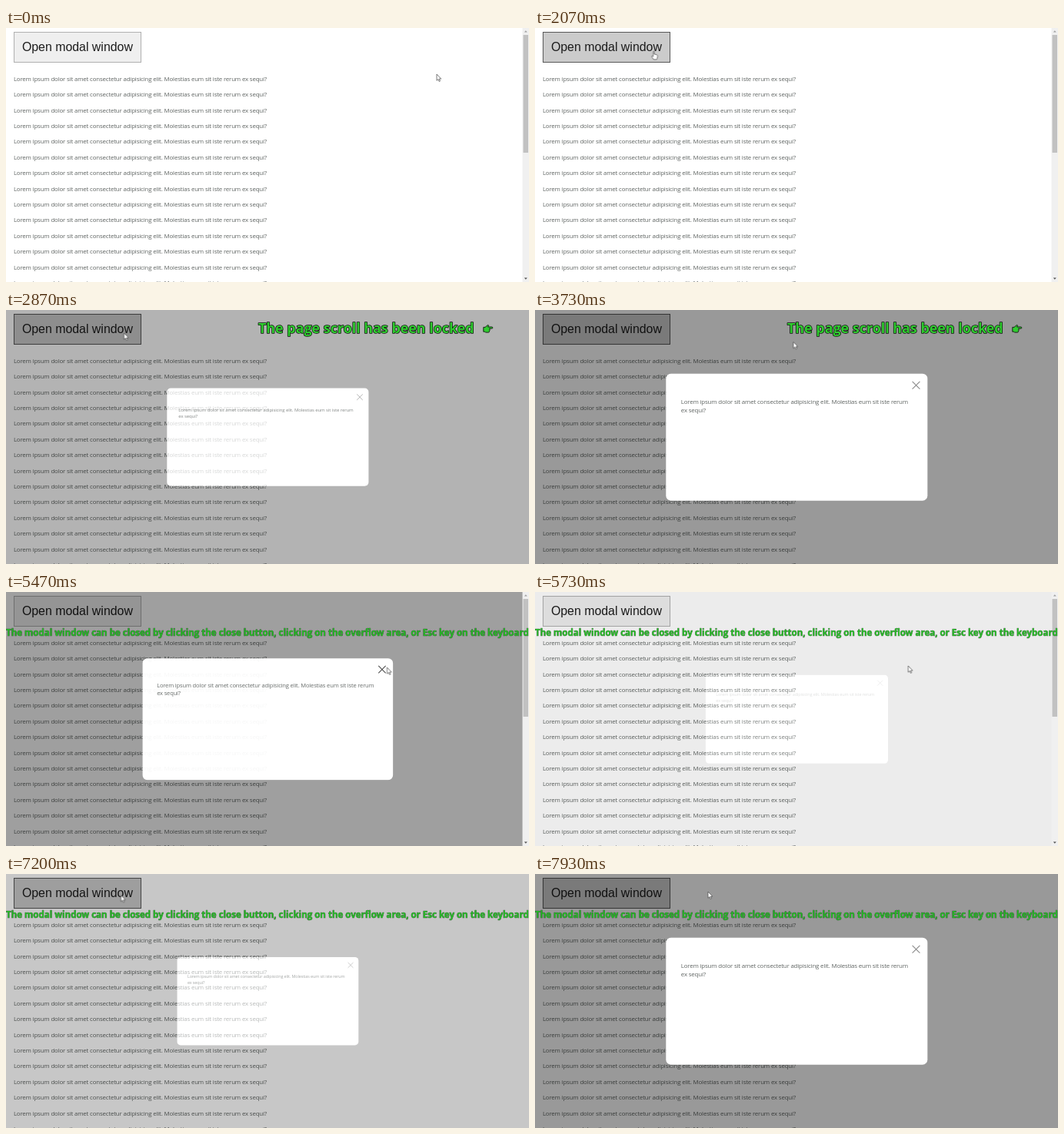
Animation, 680 px wide and 330 px high, one loop 8 s. Source, as an HTML page:

```html
<!DOCTYPE html>
<html lang="en">
<head>
<meta charset="utf-8">
<title>Modal window demo</title>
<style>
html, body { margin: 0; width: 100%; height: 100%; overflow: hidden; background: #fff; }
svg { display: block; width: 680px; height: 330px; }
svg * { animation-duration: 8s; animation-iteration-count: infinite; animation-timing-function: linear; }
text { white-space: pre; }

.copy { font: 7.9px "Open Sans", sans-serif; letter-spacing: -.17px; fill: #606563; }
.label { font: 15.9px "Liberation Sans", Arial, sans-serif; fill: #1c1c1c; }
.caption { font: bold 17.9px "Open Sans", sans-serif; fill: #2fcb2f; stroke: #111; stroke-width: 1.5; stroke-linejoin: round; paint-order: stroke; }
.caption.long { font-size: 11.52px; fill: #22b922; stroke: #000; stroke-opacity: .6; stroke-width: .7; }

.button { fill: #efefef; stroke: #b0b0b0; animation-name: press; }
.overlay { opacity: 0; animation-name: fade; }
.modal { transform-origin: 340.5px 165.2px; animation-name: grow; }
.cross { stroke: #8a8a8a; stroke-width: 1.1; animation-name: cross; }
.pointer { animation-name: travel; }
.button, .cross, .bar, .first, .second, .arrow, .hand { animation-timing-function: step-end; }
.bar { animation-name: bar; }
.first { animation-name: first; }
.second { animation-name: second; }
.arrow { animation-name: arrow; }
.hand { animation-name: hand; }

@keyframes press {
  0%, 67%, 100% { fill: #efefef; stroke: #b0b0b0; }
  19.2%, 81.4%, 99.99% { fill: #cbcbcb; stroke: #585858; }
}
@keyframes fade {
  0% { opacity: 0; }
  32.5% { opacity: 0; animation-timing-function: ease; }
  40% { opacity: 1; }
  67.86% { opacity: 1; animation-timing-function: ease; }
  75.36% { opacity: 0; }
  87.59% { opacity: 0; animation-timing-function: ease; }
  95.09%, 100% { opacity: 1; }
}
@keyframes grow {
  0%, 32.5% { transform: scale(.5); }
  38.75%, 67.86% { transform: scale(1); }
  74.11%, 87.59% { transform: scale(.5); }
  93.84%, 100% { transform: scale(1); }
}
@keyframes cross {
  0%, 71.5%, 100% { stroke: #8a8a8a; }
  57.5% { stroke: #444; }
}
@keyframes travel {
  0% { transform: translate(560px, 60px); }
  10% { transform: translate(560px, 60px); animation-timing-function: ease-in-out; }
  20.9%, 42.8% { transform: translate(153.5px, 30px); }
  46.6% { transform: translate(334.5px, 41px); animation-timing-function: ease-out; }
  53.4%, 55.6% { transform: translate(482px, 90px); }
  60.9% { transform: translate(495.5px, 98px); }
  70% { transform: translate(495.5px, 98px); animation-timing-function: ease-in-out; }
  83.4% { transform: translate(149.5px, 27.5px); }
  95.9% { transform: translate(149.5px, 27.5px); animation-timing-function: ease-out; }
  99.1%, 100% { transform: translate(225px, 23px); }
}
@keyframes bar {
  0%, 67.86% { visibility: visible; }
  32.5%, 87.59%, 100% { visibility: hidden; }
}
@keyframes first {
  0%, 50%, 100% { visibility: hidden; }
  32.5% { visibility: visible; }
}
@keyframes second {
  0% { visibility: hidden; }
  50%, 100% { visibility: visible; }
}
@keyframes arrow {
  0%, 32.5%, 87.59%, 100% { visibility: visible; }
  19.2%, 81.4% { visibility: hidden; }
}
@keyframes hand {
  0%, 32.5%, 87.59%, 100% { visibility: hidden; }
  19.2%, 81.4% { visibility: visible; }
}
</style>
</head>
<body>
<svg viewBox="0 0 680 330">
  <rect class="button" x="10.5" y="5.5" width="165" height="39"/>
  <text class="label" x="20.9" y="30.4">Open modal window</text>
  <g id="lines" class="copy"></g>

  <g class="overlay">
    <rect width="680" height="330" fill="#000" fill-opacity=".4"/>
    <g class="modal">
      <rect x="170.3" y="82.7" width="340" height="165" rx="6.5" fill="#fff"/>
      <text class="copy" x="189.8" y="122.3">Lorem ipsum dolor sit amet consectetur adipisicing elit. Molestias eum sit iste rerum</text>
      <text class="copy" x="189.8" y="132.8">ex sequi?</text>
      <path class="cross" d="M490.6 92.9l9.8 9.8m0-9.8l-9.8 9.8"/>
    </g>
  </g>

  <g class="bar">
    <rect x="671.5" width="8.5" height="330" fill="#f0f0f0"/>
    <rect x="672.5" y="9" width="6.5" height="153" fill="#c1c1c1"/>
    <path d="M673.8 5.6l2-2.4 2 2.4z" fill="#a0a0a0"/>
    <path d="M673.8 324.4l2 2.4 2-2.4z" fill="#505050"/>
  </g>

  <g class="first">
    <text class="caption" x="328" y="30">The page scroll has been locked</text>
    <path d="M620.8 22.4h2.2l3.2-2.7c1-.5 1.8.5 1.1 1.3l-.9 1h5.4c1.4 0 1.4 2.1 0 2.1h-3.3c1.2.3 1 1.7 0 1.8.8.4.6 1.6-.3 1.7.5.6.1 1.5-.8 1.5h-3.6l-1.4-.9h-1.6z" fill="#2fcb2f" stroke="#111" stroke-width=".9"/>
  </g>
  <text class="caption long second" x="0" y="56.6">The modal window can be closed by clicking the close button, clicking on the overflow area, or Esc key on the keyboard</text>

  <g class="pointer" stroke-linejoin="round">
    <path class="arrow" d="M0 0v8.3l1.9-1.7 1.3 2.9 1.3-.6-1.3-2.8h2.6z" fill="#fff" stroke="#444" stroke-width=".7"/>
    <path class="hand" d="M.2 1c0-1.2 1.4-1.2 1.4 0v3l1.3.3 1.3.3 1.2.6c.5.3.6.8.5 1.5l-.5 2.6-.6 1.6H.7l-2.2-3.3c-.8-1.1.3-1.7 1.1-1l.6.6z" fill="#fff" stroke="#444" stroke-width=".7"/>
  </g>
</svg>
<script>
const lines = document.getElementById("lines");
for (let i = 0; i < 14; i++) {
  const line = document.createElementNS(lines.namespaceURI, "text");
  line.setAttribute("x", 9.9);
  line.setAttribute("y", 68.7 + i * 20.4);
  line.textContent = "Lorem ipsum dolor sit amet consectetur adipisicing elit. Molestias eum sit iste rerum ex sequi?";
  lines.append(line);
}
</script>
</body>
</html>
```
